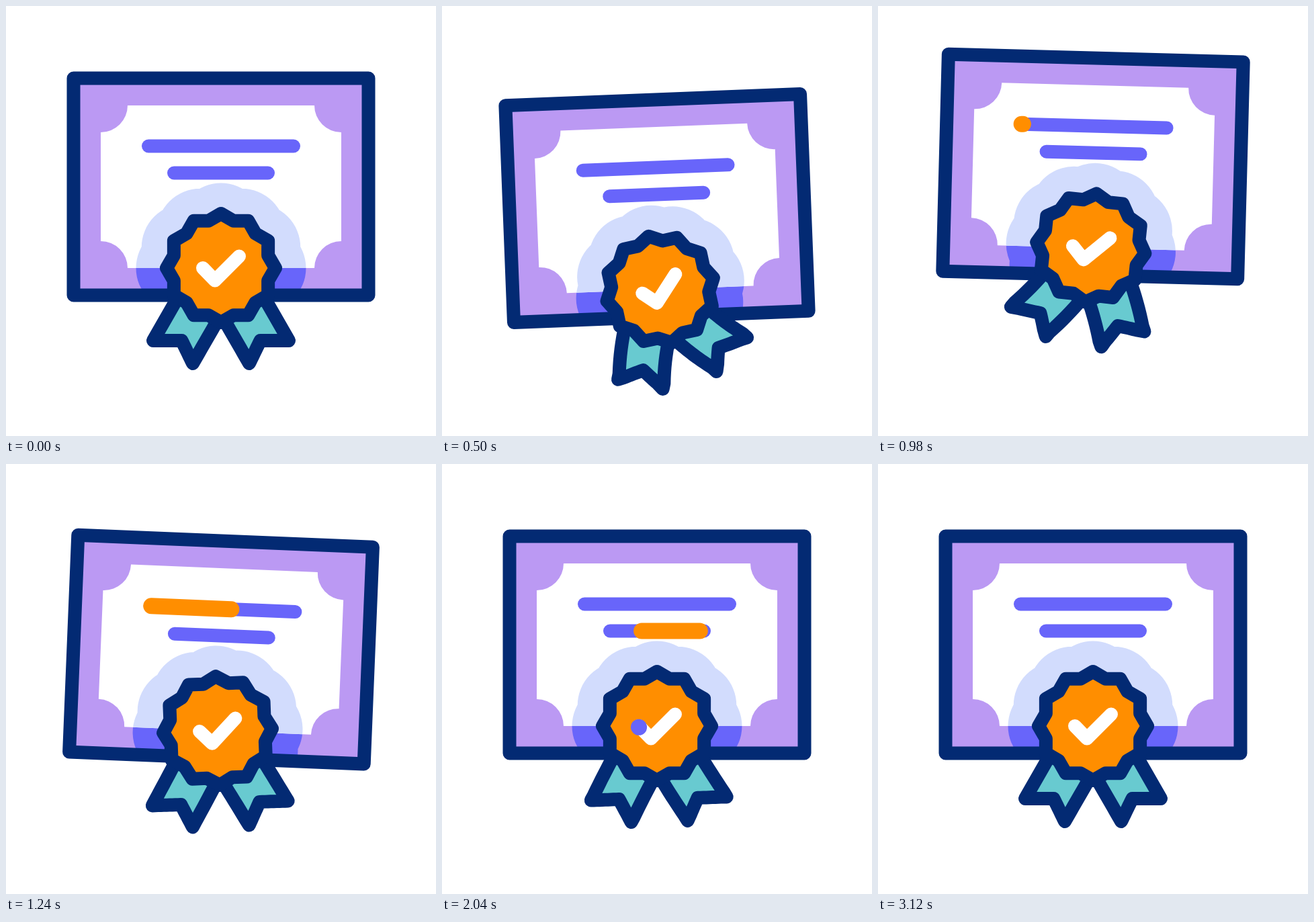
An HTML page with a canvas for the animation above (3.22 s loop, 640 by 640 pixels).

```html
<!DOCTYPE html>
<html lang="en">
<head>
<meta charset="utf-8">
<title>Certificate</title>
<style>
  html, body { margin: 0; height: 100%; overflow: hidden; background: #fff; }
  canvas { display: block; width: 640px; height: 640px; }
</style>
</head>
<body>
<canvas id="stage" width="640" height="640"></canvas>
<script>
const ctx = document.getElementById('stage').getContext('2d');
const LOOP = 3220;
const NAVY = '#032a73', LILAC = '#bb99f3', VIOLET = '#6865fa', PALE = '#d2dcfd',
      ORANGE = '#ff8e00', TEAL = '#68cad0', WHITE = '#fff';

// Motion tracks: [time, value] pairs joined by sine easing.
const LIFT = [[0, 0], [475, 32.5], [940, -31], [1400, 21], [1720, 0]];
const TILT = [[150, 0], [680, -3], [1130, 3], [1600, -2.05], [1930, 0]];
const SPIN = [[0, 0], [485, -12.3], [965, 6], [1380, -5], [1600, 1.1], [1900, 0]];
const TAIL = [[0, 0], [500, -18], [990, 10.5], [1400, -8], [1600, 2.5],
              [2000, -1.5], [2440, 0.4], [2900, 0]];

const rad = deg => deg * Math.PI / 180;
const clamp = u => Math.min(1, Math.max(0, u));
const ease = u => (1 - Math.cos(Math.PI * clamp(u))) / 2;

function track(keys, t) {
  let value = keys[0][1];
  for (let i = 1; i < keys.length; i++) {
    const [t0, v0] = keys[i - 1], [t1, v1] = keys[i];
    if (t >= t0) value = v0 + (v1 - v0) * ease((t - t0) / (t1 - t0));
  }
  return value;
}

function polyline(points, closed) {
  const path = new Path2D();
  points.forEach(([x, y]) => path.lineTo(x, y));
  if (closed) path.closePath();
  return path;
}

function fill(path, color) {
  ctx.fillStyle = color;
  ctx.fill(path);
}

function stroke(path, color, width = 20) {
  ctx.strokeStyle = color;
  ctx.lineWidth = width;
  ctx.stroke(path);
}

function scoped(draw) {
  ctx.save();
  draw();
  ctx.restore();
}

// Shapes are centred on the card, or on the seal for seal parts.
const SEAL_Y = 121;

const card = new Path2D();
card.rect(-219.5, -161.5, 439, 323);

const paper = new Path2D();
[[-179, -121, 90, 0], [179, -121, 180, 90], [179, 121, 270, 180], [-179, 121, 360, 270]]
  .forEach(([x, y, from, to]) => paper.arc(x, y, 40, rad(from), rad(to), true));
paper.closePath();

const star = polyline(Array.from({ length: 24 }, (_, i) => {
  const r = i % 2 ? 72.6 : 81;
  return [r * Math.sin(rad(i * 15)), -r * Math.cos(rad(i * 15))];
}), true);

const glow = new Path2D();
for (let i = 0; i < 12; i++) {
  const x = 61.5 * Math.cos(rad(i * 30)), y = 61.5 * Math.sin(rad(i * 30));
  glow.moveTo(x + 65, y);
  glow.arc(x, y, 65, 0, 2 * Math.PI);
}

const LINE1 = [[-108, -60.5], [108, -60.5]];
const LINE2 = [[-70, -20.5], [70, -20.5]];
const TICK = [[-27, 0], [-9, 18.5], [27, -17.5]];
const RIBBON = [[-58, 33], [-101, 108], [-58.5, 108], [-42, 142], [0, 69]];

// Part of a polyline between two fractions of its length.
function trim(points, from, to) {
  const lens = points.slice(1).map((p, i) => Math.hypot(p[0] - points[i][0], p[1] - points[i][1]));
  const total = lens.reduce((a, b) => a + b);
  const out = [];
  let pos = 0;
  lens.forEach((len, i) => {
    const a = clamp((from * total - pos) / len), b = clamp((to * total - pos) / len);
    const at = u => points[i].map((v, k) => v + (points[i + 1][k] - v) * u);
    if (b > a) out.push(at(a), at(b));
    pos += len;
  });
  return out;
}

function sweep(points, color, t, start, span, delay) {
  const head = ease((t - start) / span), tail = ease((t - start - delay) / span);
  if (head > tail) stroke(polyline(trim(points, tail, head)), color, 24);
}

// A ribbon turns with the seal at its root and with the tail angle at its tips.
function ribbon(side, spin, tail) {
  const bent = [];
  for (let i = 0; i < RIBBON.length - 1; i++) {
    for (let k = 0; k <= 10; k++) {
      const [x, y] = RIBBON[i].map((v, j) => v + (RIBBON[i + 1][j] - v) * k / 10);
      const a = rad(spin + (tail - spin) * clamp((Math.hypot(x, y) - 70) / 70));
      bent.push([side * x * Math.cos(a) - y * Math.sin(a), side * x * Math.sin(a) + y * Math.cos(a)]);
    }
  }
  const path = polyline(bent);
  fill(path, TEAL);
  stroke(path, NAVY);
}

function drawCard(t, turn) {
  const drawGlow = color => scoped(() => {
    ctx.translate(0, SEAL_Y);
    ctx.rotate(turn);
    fill(glow, color);
  });
  fill(card, LILAC);
  scoped(() => {
    ctx.clip(card);
    drawGlow(VIOLET);
    fill(paper, WHITE);
    ctx.clip(paper);
    drawGlow(PALE);
  });
  stroke(card, NAVY);
  stroke(polyline(LINE1), VIOLET);
  stroke(polyline(LINE2), VIOLET);
  sweep(LINE1, ORANGE, t, 945, 550, 265);
  sweep(LINE2, ORANGE, t, 1600, 510, 240);
}

function drawSeal(t, spin) {
  ctx.rotate(rad(spin));
  fill(star, ORANGE);
  stroke(star, NAVY);
  stroke(polyline(TICK), WHITE);
  ctx.translate(0, 1.7);
  sweep(TICK, VIOLET, t, 2025, 630, 315);
}

function render(t) {
  const tilt = track(TILT, t), spin = track(SPIN, t), tail = track(TAIL, t);
  ctx.fillStyle = WHITE;
  ctx.fillRect(0, 0, 640, 640);
  ctx.lineCap = ctx.lineJoin = 'round';
  scoped(() => {
    ctx.translate(320, 269 + track(LIFT, t));
    ctx.rotate(rad(tilt));
    drawCard(t, rad(spin - tilt));
    ctx.translate(0, SEAL_Y);
    ctx.rotate(-rad(tilt));
    ribbon(1, spin, tail);
    ribbon(-1, spin, tail);
    drawSeal(t, spin);
  });
}

const begin = performance.now();
function tick() {
  render((performance.now() - begin) % LOOP);
  requestAnimationFrame(tick);
}
tick();
</script>
</body>
</html>
```
